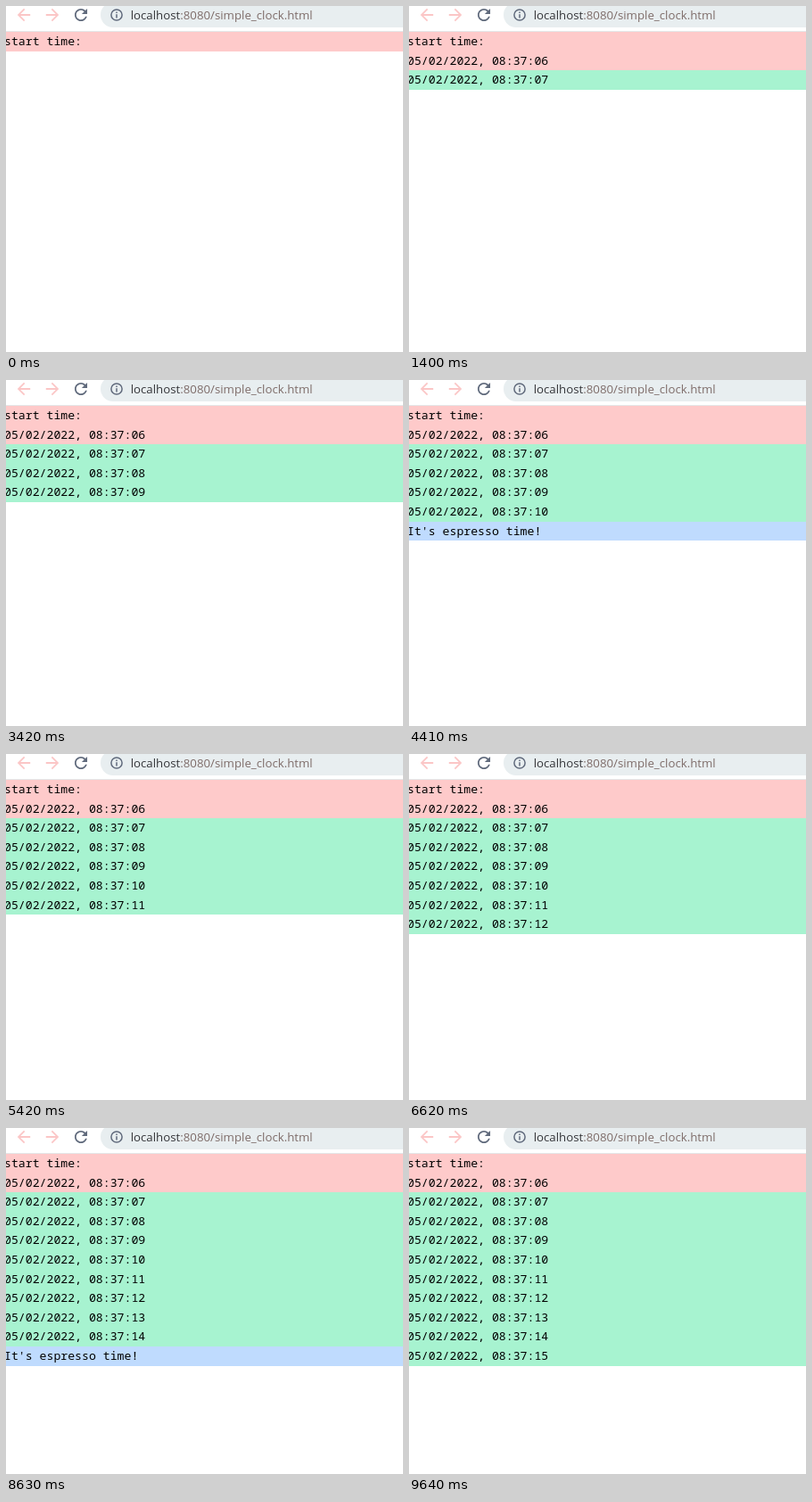
Recreate the animation shown at these times as an HTML page with a canvas. Size 445 px wide and 388 px high, loop 9.83 s.

```html
<!DOCTYPE html>
<html lang="en">
<head>
<meta charset="utf-8">
<title>Simple clock</title>
<style>
  html, body { margin: 0; width: 100%; height: 100%; overflow: hidden; background: #fff; }
  canvas { display: block; }
</style>
</head>
<body>
<canvas id="stage" width="445" height="388"></canvas>
<script>
const W = 445, H = 388, LOOP = 9830;
const ctx = document.getElementById('stage').getContext('2d');

const TOP = 29, ROW = 21.6;
const PINK = '#fecaca', GREEN = '#a7f3d0', BLUE = '#bfdbfe';
const SLATE = '#606a7c';
const MONO = '13.2px "Noto Sans Mono", "DejaVu Sans Mono", monospace';
const SANS = '13.25px "Open Sans", "Noto Sans", sans-serif';

// One clock line is added at each tick.
const ticks = [400, 1400, 2420, 3420, 4410, 5420, 6620, 7620, 8630, 9640];
// The message takes the next line until the following tick.
const messageAfter = [2, 4, 8];

const backIcon = new Path2D('M20 11H7.83l5.59-5.59L12 4l-8 8 8 8 1.41-1.41L7.83 13H20v-2z');
const reloadIcon = new Path2D('M17.65 6.35C16.2 4.9 14.21 4 12 4c-4.42 0-7.99 3.58-7.99 8s3.57 8 7.99 8c3.73 0 6.84-2.55 7.73-6h-2.08c-.82 2.33-3.04 4-5.65 4-3.31 0-6-2.69-6-6s2.69-6 6-6c1.66 0 3.14.69 4.22 1.78L13 11h7V4l-2.35 2.35z');

function icon(path, x, y, sx, sy, color) {
  ctx.save();
  ctx.translate(x, y);
  ctx.scale(sx, sy);
  ctx.translate(-12, -12);
  ctx.fillStyle = color;
  ctx.fill(path);
  ctx.restore();
}

function toolbar() {
  icon(backIcon, 20, 10, 0.9, 0.9, '#fbc6c6');
  icon(backIcon, 52, 10, -0.9, 0.9, '#fbc6c6');
  icon(reloadIcon, 84, 10, 0.88, 0.88, SLATE);

  ctx.fillStyle = '#e8eef0';
  ctx.beginPath();
  ctx.roundRect(106, -4, W, 28, 14);
  ctx.fill();

  ctx.strokeStyle = SLATE;
  ctx.lineWidth = 1.5;
  ctx.beginPath();
  ctx.arc(124, 10, 6.1, 0, Math.PI * 2);
  ctx.stroke();
  ctx.fillStyle = SLATE;
  ctx.fillRect(123.25, 6.5, 1.5, 1.5);
  ctx.fillRect(123.25, 9.2, 1.5, 4.3);

  ctx.font = SANS;
  const host = 'localhost';
  ctx.fillStyle = '#35363a';
  ctx.fillText(host, 139.7, 15);
  const hostWidth = ctx.measureText(host).width;
  ctx.fillStyle = '#7e6c69';
  ctx.fillText(':8080/simple_clock.html', 139.7 + hostWidth, 15);

  ctx.fillStyle = '#e4e6e8';
  ctx.fillRect(0, 28, W, 1);
}

function row(index, text, color) {
  const y = TOP + Math.round(ROW * index);
  const end = TOP + Math.round(ROW * (index + 1));
  ctx.fillStyle = color;
  ctx.fillRect(0, y, W, end - y);
  ctx.fillStyle = '#000';
  ctx.font = MONO;
  ctx.fillText(text, -2, y + 15);
}

function draw(t) {
  ctx.fillStyle = '#fff';
  ctx.fillRect(0, 0, W, H);
  toolbar();
  row(0, 'start time:', PINK);

  const count = ticks.filter(at => t >= at).length;
  for (let i = 0; i < count; i++) {
    const second = String(6 + i).padStart(2, '0');
    row(i + 1, `05/02/2022, 08:37:${second}`, i ? GREEN : PINK);
  }
  if (messageAfter.includes(count - 1)) row(count + 1, "It's espresso time!", BLUE);
}

const start = performance.now();
function loop() {
  draw((performance.now() - start) % LOOP);
  requestAnimationFrame(loop);
}
loop();
</script>
</body>
</html>
```
